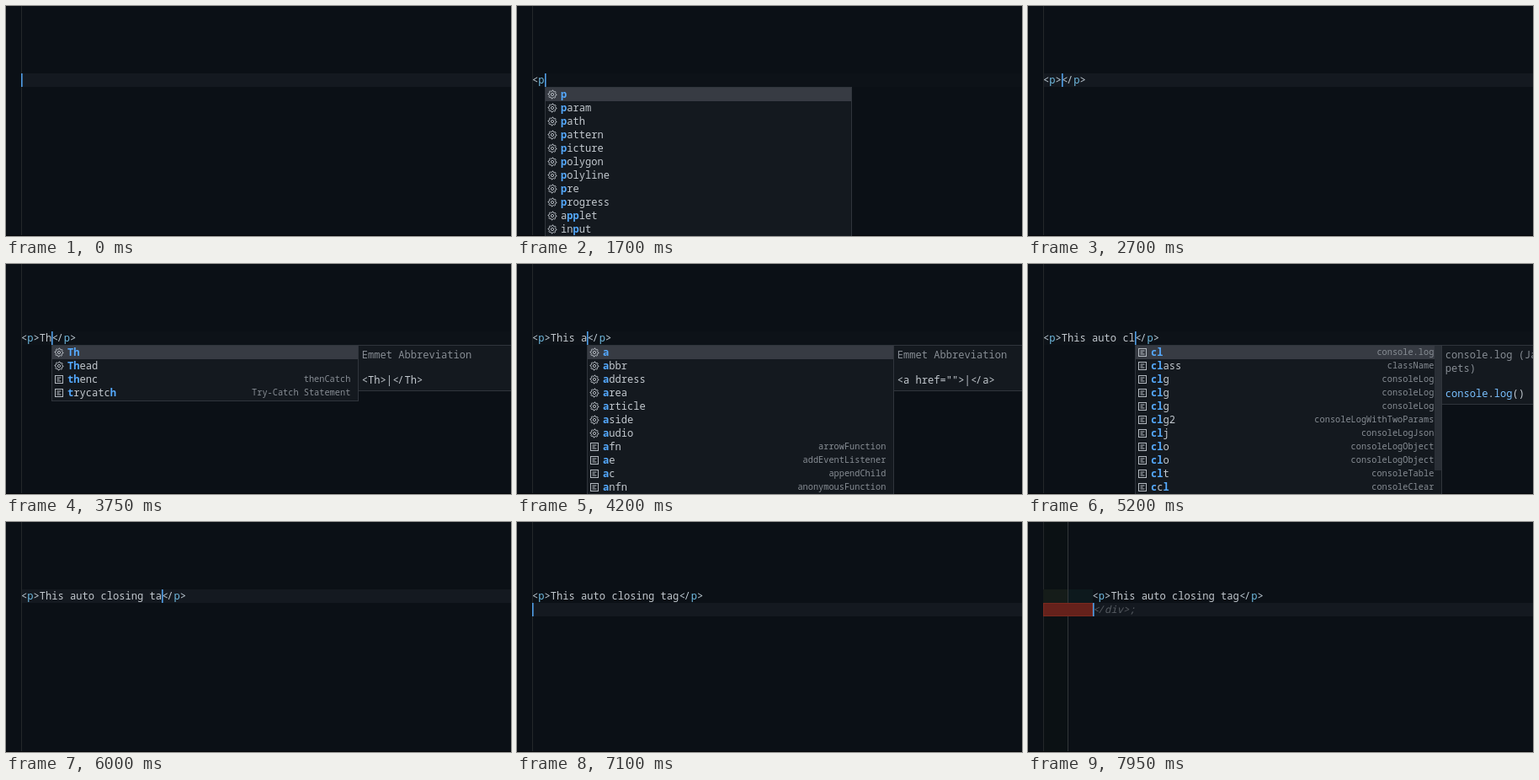
Recreate the animation shown at these times as an HTML page with a canvas. Size 600x273 px, loop 8000 ms.

```html
<!DOCTYPE html>
<html lang="en">
<head>
<meta charset="utf-8">
<title>Auto closing tag</title>
<style>
html, body { margin: 0; width: 100%; height: 100%; overflow: hidden; background: #0b1016; }
canvas { display: block; width: 600px; height: 273px; }
</style>
</head>
<body>
<canvas id="stage"></canvas>
<script>
const canvas = document.getElementById('stage');
const ctx = canvas.getContext('2d');
const ratio = window.devicePixelRatio || 1;
canvas.width = 600 * ratio;
canvas.height = 273 * ratio;

const LOOP = 8000, LEFT = 18, ROW = 80, LINE = 16, SIZE = 12.1, ADV = 0.6;
const FAMILY = '"Noto Sans Mono", "DejaVu Sans Mono", monospace';
const C = {
  bg: '#0b1016', row: '#141920', rowDim: '#0d1218', guide: '#24282a',
  text: '#c3c9cf', punct: '#c0cdd6', tag: '#72bde3', caret: '#519fe8',
  box: '#14191f', edge: '#30353c', pick: '#373b43', match: '#55aaff',
  dim: '#878d94', ghost: '#565b61', call: '#79c0ff', arrow: '#d9822b'
};

// An asterisk in a label marks the next character as matched.
const list = (icon, ...rows) => rows.map(r => {
  const [label, detail = ''] = r.split('|');
  return { icon, label, detail };
});
const gear = (...rows) => list('gear', ...rows);
const snip = (...rows) => list('snip', ...rows);

const tagItems = gear('*p', '*param', '*path', '*pattern', '*picture', '*polygon',
  '*polyline', '*pre', '*progress', 'a*p*plet', 'in*put');
const popups = {
  p: { items: tagItems },
  pDoc: { items: tagItems, doc: { info: ['Emmet Abbreviation'], code: [[['<p>|</p>', C.text]]] } },
  T: {
    items: [...gear('*T'), ...snip('*tc|tryCatch', '*tf|tryFinally', '*tcf|tryCatchFinally',
      '*thenc|thenCatch', '*timeout|setTimeout', '*trycatch|Try-Catch Statement',
      '*throw|throwError', '*test|testBlock', '*ter|ternary', 's*to|setTimeout')],
    doc: { info: ['Emmet Abbreviation'], code: [[['<T>|</T>', C.text]]] }
  },
  Th: {
    items: [...gear('*T*h', '*T*head'), ...snip('*t*henc|thenCatch', '*trycatc*h|Try-Catch Statement')],
    doc: { info: ['Emmet Abbreviation'], code: [[['<Th>|</Th>', C.text]]] }
  },
  Thi: {
    items: gear('*T*h*i'),
    doc: { info: ['Emmet Abbreviation'], code: [[['<Thi>|</Thi>', C.text]]] }
  },
  a: {
    items: [...gear('*a', '*abbr', '*address', '*area', '*article', '*aside', '*audio'),
      ...snip('*afn|arrowFunction', '*ae|addEventListener', '*ac|appendChild', '*anfn|anonymousFunction')],
    doc: { info: ['Emmet Abbreviation'], code: [[['<a href="">|</a>', C.text]]] }
  },
  auto: {
    items: snip('wrap *selection in *arrow f*unc…|wrap selection i…',
      'wrap selection *in a*sync *arrow f*u…|wrap selecti…'),
    doc: {
      info: ['wraps text in arrow', 'ardjs styled snippets'],
      code: [[['() ', C.text], ['=>', C.arrow], [' {', C.text]], [['    {}', C.text]], [['}', C.text]]]
    }
  },
  c: {
    items: snip('*c|class', '*cas|console.assert', '*ccl|consoleClear', '*cco|consoleCount',
      '*cl|console.log', '*class|className', '*clg|consoleLog', '*clj|consoleLogJson',
      '*clo|consoleLogObject', '*clt|consoleTable', '*cwa|consoleWarn'),
    doc: { info: ['class (JavaScript', 'Snippets)'], code: [[['class', C.call], [' {}', C.text]]] }
  },
  cl: {
    items: snip('*c*l|console.log', '*c*lass|className', '*c*lg|consoleLog', '*c*lg|consoleLog',
      '*c*lg|consoleLog', '*c*lg2|consoleLogWithTwoParams', '*c*lj|consoleLogJson',
      '*c*lo|consoleLogObject', '*c*lo|consoleLogObject', '*c*lt|consoleTable', '*cc*l|consoleClear'),
    scroll: true,
    doc: {
      info: ['console.log (JavaScript', 'pets)'],
      code: [[['console', C.call], ['.', C.text], ['log', C.call], ['()', C.text]]]
    }
  },
  clo: {
    items: snip('*c*l*o|consoleLogObject', '*c*l*o|consoleLogObject'),
    doc: {
      info: ['console.log (JavaScript', 'pets)'],
      code: [[['console', C.call], ['.', C.text], ['log', C.call], ['()', C.text]]]
    }
  }
};

// [start time, text before the caret, open popup]
const typing = [
  [0, ''], [750, '<'], [1100, '<p'], [1200, '<p', 'p'], [2250, '<p', 'pDoc'], [2450, '<p>'],
  [2900, '<p>T'], [3000, '<p>T', 'T'], [3600, '<p>Th', 'Th'], [3800, '<p>Thi', 'Thi'],
  [3950, '<p>This'], [4100, '<p>This '], [4150, '<p>This a', 'a'], [4250, '<p>This au', 'auto'],
  [4350, '<p>This aut', 'auto'], [4450, '<p>This auto', 'auto'], [4850, '<p>This auto '],
  [5000, '<p>This auto c', 'c'], [5150, '<p>This auto cl', 'cl'], [5300, '<p>This auto clo', 'clo'],
  [5400, '<p>This auto clos'], [5500, '<p>This auto closi'], [5600, '<p>This auto closin'],
  [5650, '<p>This auto closing'], [5750, '<p>This auto closing '], [5850, '<p>This auto closing t'],
  [5950, '<p>This auto closing ta'], [6200, '<p>This auto closing tag']
];
const hidden = [[50, 550], [4600, 4850], [6500, 6800]];
const END = 6800, ENTER = 7100, INDENT = 7400, GHOST = 7700;

function rect(x, y, w, h, color) {
  ctx.fillStyle = color;
  ctx.fillRect(x, y, w, h);
}

function put(str, x, y, color, size = SIZE, style = '') {
  ctx.font = `${style} ${size}px ${FAMILY}`;
  ctx.fillStyle = color;
  for (let i = 0; i < str.length; i++) {
    let dx = 0;
    if (str[i] === '<' && str[i + 1] === '/') dx = 0.5;
    if (str[i] === '/' && str[i - 1] === '<') dx = -1;
    if (str[i] !== ' ') ctx.fillText(str[i], x + i * size * ADV + dx, y);
  }
  return x + str.length * size * ADV;
}

function putMarked(label, x, y) {
  for (let i = 0; i < label.length; i++) {
    const bold = label[i] === '*';
    if (bold) i++;
    x = put(label[i], x, y, bold ? C.match : C.text, SIZE, bold ? 'bold' : '');
  }
}

function putMarkup(str, x, y) {
  for (const part of str.match(/<\/?|>|[^<>]+/g) || []) {
    const mark = /[<>]/.test(part);
    const tag = part === 'p';
    x = put(part, x, y, mark ? C.punct : tag ? C.tag : C.text);
  }
}

function path(points) {
  ctx.beginPath();
  points.forEach(([x, y], i) => i ? ctx.lineTo(x, y) : ctx.moveTo(x, y));
  ctx.stroke();
}

function drawIcon(kind, x, y) {
  ctx.strokeStyle = '#b4bac1';
  ctx.lineWidth = 1;
  if (kind === 'snip') {
    ctx.strokeRect(x - 4.5, y - 4.5, 9, 9);
    for (const [dy, w] of [[-2, 5], [0, 3], [2, 5]]) path([[x - 2.5, y + dy], [x - 2.5 + w, y + dy]]);
    return;
  }
  const teeth = [];
  for (let i = 0; i <= 32; i++) {
    const a = i * Math.PI / 16, r = i % 4 < 2 ? 5 : 3.7;
    teeth.push([x + r * Math.cos(a), y + r * Math.sin(a)]);
  }
  path(teeth);
  ctx.beginPath();
  ctx.arc(x, y, 1.6, 0, 7);
  ctx.stroke();
}

function panel(x, y, w, h) {
  rect(x, y, w, h, C.edge);
  rect(x + 1, y + 1, w - 2, h - 2, C.box);
}

function drawArrow(x, y) {
  ctx.strokeStyle = C.arrow;
  ctx.lineWidth = 1.1;
  path([[x + 1, y - 5.7], [x + 11, y - 5.7]]);
  path([[x + 1, y - 2.7], [x + 11, y - 2.7]]);
  path([[x + 8.5, y - 8], [x + 13, y - 4.2], [x + 8.5, y - 0.4]]);
}

function drawDoc({ info, code }, x) {
  const first = 112 + (info.length - 1) * LINE + 30;
  panel(x, 96, 640 - x, first + (code.length - 1) * LINE + 9 - 96);
  info.forEach((s, i) => put(s, x + 4.7, 112 + i * LINE, C.dim));
  code.forEach((parts, i) => {
    let cx = x + 4.7;
    for (const [s, color] of parts) {
      if (s === '=>') {
        drawArrow(cx, first);
        cx += 2 * SIZE * ADV;
      } else cx = put(s, cx, first + i * LINE, color);
    }
  });
}

function drawPopup({ items, doc, scroll }, x) {
  panel(x, 96, 365, items.length * LINE + 3);
  rect(x + 1, 97, 363, LINE, C.pick);
  items.forEach(({ icon, label, detail }, i) => {
    const y = 104.5 + i * LINE;
    drawIcon(icon, x + 9, y + 0.5);
    putMarked(label, x + 19, y + 4);
    const size = SIZE * 0.85, end = detail.endsWith('…') ? 351.5 : 355.3;
    put(detail, x + end - detail.length * size * ADV, y + 3.5, C.dim, size);
  });
  if (scroll) rect(x + 356, 97, 8, 148, '#2a2f36');
  if (doc) drawDoc(doc, x + 364);
}

function drawCaret(x, y) {
  rect(Math.round(x), y, 1.6, LINE, C.caret);
}

function render(t) {
  ctx.setTransform(ratio, 0, 0, ratio, 0, 0);
  rect(0, 0, 600, 273, C.bg);
  const [, typed, open] = typing.filter(s => s[0] <= t).pop();
  const closing = typed.startsWith('<p>') ? '</p>' : '';
  const entered = t >= ENTER, indented = t >= INDENT;
  const x = indented ? 76.6 : LEFT;
  const y = entered ? ROW + LINE : ROW;

  rect(LEFT, y, 582, LINE, open ? C.rowDim : C.row);
  rect(LEFT, 0, 1, 273, C.guide);
  if (indented) {
    rect(19, 0, 28, 273, '#0b1114');
    rect(LEFT, ROW, 29, LINE, '#151c19');
    rect(47, ROW, 30, LINE, '#0d191d');
    rect(47, 0, 1, 273, '#33383a');
    rect(LEFT, ROW + LINE, 59, LINE, '#7a291f');
    rect(LEFT + 1, ROW + LINE + 1, 57, LINE - 2, '#65211b');
  }
  rect(0, 272, 600, 1, '#040608');

  putMarkup(typed + closing, x, 92);
  if (t >= GHOST) put('</div>;', x, 108, C.ghost, SIZE, 'italic');

  const shown = t >= END ? typed + closing : typed;
  const caretX = entered ? x : x + shown.length * SIZE * ADV;
  if (!hidden.some(([from, to]) => t >= from && t < to)) drawCaret(caretX, y);
  if (open) drawPopup(popups[open], Math.round(caretX));
}

const start = performance.now();
function tick() {
  render((performance.now() - start) % LOOP);
  requestAnimationFrame(tick);
}
tick();
</script>
</body>
</html>
```
